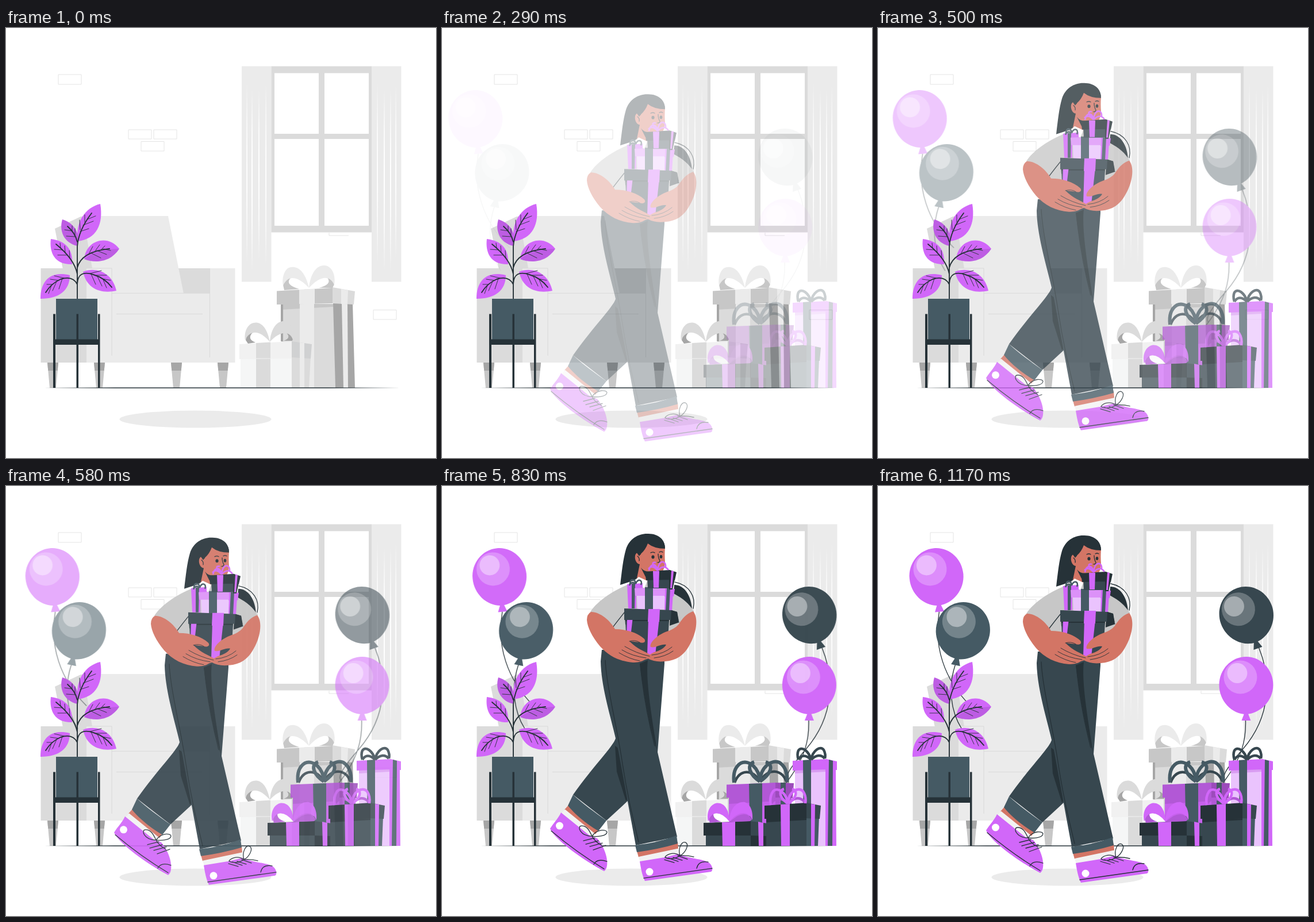
An HTML page that plays this animation: 748 px wide and 748 px high, repeating every 1.21 s.

```html
<!DOCTYPE html>
<html lang="en">
<head>
<meta charset="utf-8">
<title>Carrying gifts</title>
<style>
  html, body { margin: 0; width: 100%; height: 100%; overflow: hidden; background: #fff; }
  svg { display: block; width: 100vw; height: 100vh; }
  .pink { fill: #d167f9; }
  .plum { fill: #b258d6; }
  .pale { fill: #eac3fd; }
  .ink { fill: #263238; }
  .dark { fill: #37474f; }
  .slate { fill: #455a64; }
  .skin { fill: #d37565; }
  .g1 { fill: #ebebeb; }
  .g2 { fill: #dbdbdb; }
  .g3 { fill: #c7c7c7; }
  .g4 { fill: #a6a6a6; }
  .w { fill: #fff; }
  .line { fill: none; stroke: #263238; stroke-width: 1.3; stroke-linecap: round; stroke-linejoin: round; }
  .stem { stroke-width: 1.9; }
  .vein { stroke-width: .9; }
  .thin { fill: none; stroke: #e4e4e4; stroke-width: 1; }
  .seam { stroke: #d9d9d9; }
  .bow { fill: none; stroke-width: 6; stroke-linejoin: round; }
  .mid { stroke-width: 4.5; }
  .small { stroke-width: 2.6; }
  .rise, .slide, .fade { opacity: 0; }
</style>
</head>
<body>
<svg viewBox="0 0 748 748">
  <defs>
    <g id="leg">
      <path class="g3" d="M0 582h19l-4 44h-11z"/>
      <path class="g4" d="M0 582h19l-1.300 14h-16.400z"/>
    </g>
    <g id="balloon">
      <path d="M0-50C26-50 47-28 47-1C47 27 24 49 0 50C-25 50-47 27-47-1C-47-28-26-50 0-50Z"/>
      <path d="M-3 48h6l5 13h-16z"/>
      <circle class="w" cx="-10" cy="-14.500" r="29" opacity=".25"/>
      <circle class="w" cx="-15.500" cy="-21.500" r="17.500" opacity=".4"/>
    </g>
  </defs>

  <!-- room -->
  <path class="thin" d="M91 81h40v17h-40zM213 177h40v16h-40zM257 177h40v16h-40zM235 197.500h40v16.500h-40zM639 490.500h40v16.500h-40zM562 356v5h34"/>
  <path class="g1" d="M410 66.500h51.500v375h-51.500zM636 66.500h51.500v375h-51.500z"/>
  <path class="g2" fill-rule="evenodd" d="M461.500 66.500h174.500v289h-174.500zM467 78.500v105.500h77v-105.500zM554 78.500v105.500h77v-105.500zM467 193v151h77v-151zM554 193v151h77v-151z"/>
  <path class="w" d="M419 92q2 170 0 320q-1.500-160 0-320M428 105q2 150 0 320q-2-160 0-320M440 105q1.800 150 0 300q-2-150 0-300M452 95q2 150 0 320q-1.500-150 0-320M646 92q2 170 0 320q-1.500-160 0-320M658 105q2 150 0 320q-2-160 0-320M669 105q1.800 150 0 320q-2-150 0-320M678 95q2 150 0 310q-1.500-150 0-310"/>

  <!-- armchair -->
  <use href="#leg" x="72"/><use href="#leg" x="153"/><use href="#leg" x="287"/><use href="#leg" x="368"/>
  <path class="g2" d="M85 349L130 328L150 327V420H99zM300 418h56v44h-56z"/>
  <path class="g1" d="M134 327H282L309 462H160L150 418zM140 418h44v43h171v-43h43.500v164h-258.500z"/>
  <path class="g2" d="M60.500 418h79.500v164h-79.500z"/>
  <path class="thin seam" d="M140 418h44v152M184 461.300h171M192 497.500h150M354.500 418v155"/>

  <!-- pale gifts -->
  <path class="g2" d="M478 480h94l1 146h-93z"/>
  <path class="g3" d="M478 480h92v5l-92 5z"/>
  <path class="g1" d="M511 480h25v146h-25z"/>
  <path class="g4" d="M569 478h34l4 148h-34zM478 481h4v64h-4z"/>
  <path class="g1" d="M584 478h10l1 148h-8z"/>
  <path class="g3" d="M471 457.500L568 452V479L471 481z"/>
  <path class="g2" d="M568 451L607 458L605 481L568 479z"/>
  <path class="g1" d="M510 455l27-1.500v26.500h-27zM583 454l12 2-1 24h-11z"/>
  <path class="g3" d="M482 447C484 437 491 432 499 432C488 439 488 448 510 454L484 456zM571 446C570 436 563 431 555 431C565 438 565 447 544 452L568 452z"/>
  <path class="g1" d="M527 452C520 420 504 411 490 418C482 425 480 438 482 448C490 430 506 430 527 452C530 424 543 409 559 414C571 420 573 435 571 447C563 428 545 432 527 452"/>
  <path fill="#f5f6f6" d="M408 574h90v52h-90z"/>
  <path class="g2" d="M435 574h25v52h-25zM497 572h33l-3 54h-30z"/>
  <path fill="#f1f1f1" d="M406 550L497 545V575L406 576z"/>
  <path fill="#d0d1d2" d="M497 545L532 550L530 575L497 573z"/>
  <path class="g2" d="M435 548l25-1.500v28h-25z"/>
  <path class="g1" d="M511 547l8 1v78h-8z"/>
  <path class="g4" d="M417 543C418 535 423 530 430 529C422 536 423 543 434 547L421 549zM499 541C498 534 493 529 486 529C494 535 493 541 483 544L498 544z"/>
  <path class="g2" d="M459 546C454 520 443 510 430 513C419 516 414 530 416 543C425 524 442 526 459 546C461 523 471 508 487 510C498 515 500 531 499 542C493 525 475 528 459 546"/>

  <path class="ink" d="M64 626L190 625.300H560L687 626L560 626.800H190z"/>
  <ellipse class="g1" cx="329.500" cy="680.500" rx="132" ry="15"/>

  <!-- balloons -->
  <g class="slide">
    <path class="line" d="M106 219C96 278 114 336 160 382M134 311C121 350 126 392 145 422M662 281C682 330 686 398 634 458S610 505 600 516M639 407C640 440 634 472 600 516"/>
    <use href="#balloon" class="pink" transform="translate(101.300 158) rotate(-5)"/>
    <use href="#balloon" class="slate" transform="translate(147.200 252) rotate(12)"/>
    <use href="#balloon" class="dark" transform="translate(640.700 224.700) rotate(-19)"/>
    <use href="#balloon" class="pink" transform="translate(640 347)"/>
  </g>

  <!-- plant -->
  <path class="pink" d="M125 370C120 338 138 312 164 306C170 342 157 367 125 371zM115 411C85 412 75 391 78 367C104 370 117 385 115 411zM60 471C60 440 77 422 111 430C111 456 93 471 60 471zM134 424C155 415 185 424 192 457C164 463 140 453 134 424zM136 402C139 369 177 358 197 384z"/>
  <path fill="#bd5de3" d="M124 379C101 374 92 353 98 333C118 339 130 356 124 379zM136 402Q157 385 197 384C181 409 154 409 136 402z"/>
  <path class="line stem" d="M124 471V380Q126 352 149 322M124 372Q120 356 107 345M124 417Q131 389 180 384M124 428Q119 402 87 376M124 446Q116 430 95 437Q79 444 69 460M124 445Q125 420 152 429Q172 435 184 451"/>
  <path class="line vein" d="M129 351l-1-17M137 338l0-13M129 354l15-5M134 343l18-7M141 333l15-6M120 361l0-12M115 353l0-9M115 353l-13-2M120 363l-15-1M111 400l-1-13M103 391l-1-12M95 383l-1-9M106 395l-16 0M98 386l-14-1M144 393l7-13M155 388l8-11M166 385l6-6M147 391l18 9M158 387l17 7M168 384l14 3M101 435l-17-4M91 439l-14-2M81 446l-10 0M98 436l-6 18M88 441l-7 16M79 448l-5 14M146 427l20-5M157 430l18 0M167 436l15 3M148 428l8 18M159 432l8 17M169 438l6 14"/>
  <path class="slate" d="M87 471h72v72h-72z"/>
  <path class="ink" d="M82 497.500h4v44h74v-44h3.500v128.500h-3.500v-75h-34v75h-3.500v-75h-36.500v75h-4zM122.500 497.500h3.500v45h-3.500z"/>

  <!-- bright gifts -->
  <g class="fade">
    <path class="pale" d="M614 492h53v134h-53z"/>
    <path fill="#d99cf2" d="M614 493h53v4l-53 3z"/>
    <path class="pink" d="M667 492h18l1 134h-19zM610 478L669 475V493L610 495zM669 475L687 479V494L669 493z"/>
    <path class="slate" d="M628 477l14-1v150h-13zM673 476l7 2-1 148h-8z"/>
    <path class="bow mid" stroke="#37474f" d="M642 476C638 461 626 452 620 460Q617 467 620 476M642 476C645 460 658 451 664 459Q668 467 666 474M642 476Q628 463 620 476M642 476Q656 463 666 474"/>

    <path fill="#c661ec" d="M499 542h82v84h-82z"/>
    <path class="plum" d="M499 542h82v6l-82 5zM580 540h28v86h-28zM495 519.500L580 516V542H495z"/>
    <path fill="#9c4bbb" d="M580 516L612 517L610 543L580 542z"/>
    <path class="slate" d="M534 518l23-1v109h-21zM589 516h9l-1 100h-8z"/>
    <path class="bow mid" stroke="#37474f" d="M553 514C540 492 518 492 509 516M553 514C567 490 591 492 599 514"/>
    <path class="bow" stroke="#455a64" d="M553 514C552 490 534 476 520 482Q505 491 508 516M553 514C554 489 573 475 587 481Q602 491 600 515M553 514C536 503 528 485 543 480M553 514C571 502 579 485 563 480"/>

    <path class="dark" d="M459 606h78v20h-78z"/>
    <path class="ink" d="M537 606h30v20h-30zM455 586L537 583V608H455z"/>
    <path class="dark" d="M537 583L567 587L566 609L537 608z"/>
    <path class="pink" d="M487 585l23-1v42h-22zM550 584l9 2v40h-8z"/>
    <path class="plum" d="M464 580Q468 570 474 568Q468 578 486 584L466 586zM539 580Q532 566 514 574L500 584L536 583z"/>
    <path class="pink" d="M500 584C500 561 489 549 476 552C464 556 460 570 463 584C468 566 482 564 500 584C500 561 513 548 527 550C539 555 541 570 540 581C532 563 514 566 500 584z"/>
    <path class="w" d="M472 571Q485 565 500 584Q474 585 472 571z"/>

    <path class="dark" d="M564 576h70v50h-70z"/>
    <path class="ink" d="M564 576h70v5l-70 4zM561 556L634 551V578L561 579z"/>
    <path class="slate" d="M634 575h22l-2 51h-20z"/>
    <path class="dark" d="M634 551L659 556L657 579L634 578z"/>
    <path class="pink" d="M589 554l16-1v73h-15zM642 553l7 1-1 72h-6z"/>
    <path class="bow mid" stroke="#b258d6" d="M602 552Q582 535 571 554M602 552Q620 535 632 551"/>
    <path class="bow mid" stroke="#d167f9" d="M602 552C598 533 584 523 576 531Q569 541 572 555M602 552C602 532 620 522 628 531Q634 540 632 552M602 552C588 544 584 530 595 527M602 552C616 544 620 530 609 527"/>
  </g>

  <!-- woman -->
  <g class="rise">
    <!-- rear foot -->
    <path class="skin" d="M222 556L273 599L267 609L213 566z"/>
    <path fill="#f2f2f2" d="M214 565.500L267 608.500L262 617L207 574z"/>
    <path class="pink" d="M207 571C202 582 194 589 188 599C197 619 246 654 282 673C289 668 288 654 285 644C282 633 276 623 270 616L258 612z"/>
    <path class="line" d="M190 603Q235 641 282 669M264 661Q270 650 287 656M246 620l20-5M250 626l22-6M257 630l22-6M263 636l22-8M261 612C240 612 234 594 243 594C253 594 257 604 261 612C270 599 286 600 287 605C286 613 268 613 261 612Q266 622 278 628"/>
    <circle class="w" cx="204.500" cy="594" r="6.500"/>
    <path class="dark" d="M302 442C298 456 264 489 228 540L286 585L325 549L330 440z"/>
    <path class="ink" d="M301 455L308 460L325 545L320 551L304 500z"/>
    <path class="slate" d="M228 540C244 555 266 571 286 585L272 603C250 590 231 574 219 559z"/>

    <!-- front foot -->
    <path class="skin" d="M339 638L410 622L411 634L342 649z"/>
    <path fill="#f2f2f2" d="M342 648L411 633.500L413 644L345 658z"/>
    <path class="pink" d="M344 656L387 649L412 643C430 652 453 651 464 658C471 663 472 672 468 674L353 690C348 680 346 668 344 656z"/>
    <path class="line" d="M351 685L470 668M443 668Q446 654 463 657M387 653l17 5M394 650l17 6M402 649l16 5M410 646l17 6M414 646C401 637 388 646 388 649C395 653 408 651 414 646C410 633 417 620 424 623C431 628 422 642 414 646Q426 645 438 648"/>
    <circle class="w" cx="361" cy="674" r="6.500"/>
    <path class="dark" d="M278 288H387V312L375 466L409 613L337 628L307 465C299 420 277 360 276 308z"/>
    <path class="ink" d="M344 312L358 306C354 340 364 400 374 462C362 430 350 360 344 312z"/>
    <path class="line" d="M284 306C286 350 304 420 313 480S332 580 342 622M345 312C350 370 361 420 370 455"/>
    <path class="slate" d="M336 628Q374 624 408 611L410 625Q376 635 339 640z"/>

    <!-- head and hair -->
    <path class="ink" d="M404 175C421 175 434 193 435 220L402 198z"/>
    <path class="line" d="M405 170C430 175 442 195 437 216"/>
    <path class="ink" d="M310 175C313 150 315 130 320 113C326 94 343 85 359 86C377 86 388 97 388 111L352 150L338 166z"/>
    <path class="skin" d="M345 108L366 98L388 110Q387 124 388 135Q387 152 378 157L356 158L357 172L338 168L344 139C335 138 333 121 340 119Q343 118 346 123z"/>
    <path class="ink" d="M343 125L338 118L334 106L345 92Q371 83 382 95Q388 102 388 112Q369 112 358 103Q354 114 346 121zM346 145Q351 152 360 152L354 161z"/>
    <path class="line" d="M363 119q4-2 7 0M378 118q3-2 6 0M376 121q0 7 3 12q0 3-4 3M340 125q4 3 3 8"/>
    <ellipse class="ink" cx="367" cy="126.500" rx="2.600" ry="3"/><ellipse class="ink" cx="381" cy="126" rx="2.300" ry="3"/>

    <!-- shirt -->
    <path class="g3" d="M340 163L320 176C292 188 268 206 258 222L296 256L302 290H385L412 244L438 221C430 208 420 199 403 190z"/>
    <path class="w" d="M342 161L357 168L352 181L334 170z"/>
    <path class="line" d="M296 250Q309 233 322 217"/>

    <!-- carried gifts -->
    <path class="ink" d="M397 222L413 240L396 246zM318 230H395V240L319 244z"/>
    <path class="dark" d="M319 238H395L391 300H322z"/>
    <path class="pink" d="M322 231h10l-4 34h-7zM359 233h19l-7 64h-14z"/>
    <path class="pink" d="M322 174L349 172V183L338 184V216H324z"/>
    <path class="slate" d="M330 173h6l-1 43h-5z"/>
    <path class="pale" d="M339 190h51v28h-50z"/>
    <path class="pink" d="M388 190h14l-2 30h-13zM387 180L405 182L403 195H387z"/>
    <path fill="#dc91f8" d="M335 181L388 179V194H336z"/>
    <path class="slate" d="M353 179h14v40h-14zM391 181h6l-2 39h-6z"/>
    <path class="dark" d="M317 216L399 219L409 222L411 237L397 236L317 236z"/>
    <path class="ink" d="M399 219L409 222L412 238L398 237z"/>
    <path class="pink" d="M359 217h20l-1 22h-20z"/>
    <path class="dark" d="M357 164h47l-3 17h-43z"/>
    <path class="ink" d="M353 152L396 149V166L355 167zM396 149L408 153L405 167L396 166zM395 164l10 1-4 18h-6z"/>
    <path class="pink" d="M367 151h11l-1 29h-9zM399 150l4 1-3 30h-3z"/>
    <path class="bow small" stroke="#455a64" d="M337 173C336 164 327 163 327 173M337 173C340 163 350 166 346 175M337 173Q329 168 326 176"/>
    <path class="bow small" stroke="#d167f9" d="M375 150C372 134 362 139 360 150M375 150C376 131 390 131 389 144M375 150Q365 139 359 147M375 150Q386 138 394 149M375 150Q360 134 372 136"/>

    <!-- arms -->
    <path class="skin" d="M259 222C276 222 293 238 301 252C321 252 340 258 352 269C356 275 349 277 344 275L326 273C340 287 352 290 363 297C365 302 358 303 353 305C347 309 340 310 332 310C309 308 290 299 275 282C261 265 253 249 252 236Q252 226 259 222z"/>
    <path class="skin" d="M437 221C447 233 442 260 431 279C422 297 407 307 388 308Q370 310 358 303C358 298 363 295 369 292C378 290 387 285 390 279C381 277 372 285 363 283C360 277 373 261 397 254Q410 248 414 240C421 230 429 223 437 221z"/>
    <path class="line vein" d="M313 288q18 11 42 14M308 293q18 11 36 14M318 282q20 12 43 17M400 283q-14 12-35 14M402 290q-14 10-33 12M326 273q10-3 18 2"/>
  </g>
</svg>
<script>
  const LOOP = 1210, FPS = 24;
  const all = q => document.querySelectorAll(q);

  const bez = (s, a, b) => 3 * s * (1 - s) * ((1 - s) * a + s * b) + s * s * s;

  // cubic-bezier(.36, -.01, .5, 1.38), which overshoots before settling
  function ease(x) {
    if (x <= 0) return 0;
    if (x >= 1) return 1;
    let lo = 0, hi = 1;
    for (let i = 0; i < 24; i++) {
      const mid = (lo + hi) / 2;
      if (bez(mid, .36, .5) < x) lo = mid; else hi = mid;
    }
    return bez(lo, -.01, 1.38);
  }

  const parts = [
    { els: all('.rise'), delay: 0, x: 0, y: 44.88 },
    { els: all('.fade'), delay: .05, x: 0, y: 0 },
    { els: all('.slide'), delay: .2, x: -44.88, y: 0 }
  ];

  function draw(ms) {
    let step = Math.floor((ms % LOOP + 5) * FPS / 1000);
    if (step < 2) step = 0;
    const sec = (step + .5) / FPS;
    for (const p of parts) {
      const e = ease(sec - p.delay), rest = 1 - e;
      for (const el of p.els) {
        el.style.opacity = Math.max(0, Math.min(1, e));
        el.setAttribute('transform', `translate(${p.x * rest} ${p.y * rest})`);
      }
    }
  }

  const start = performance.now();
  function tick() {
    draw(performance.now() - start);
    requestAnimationFrame(tick);
  }
  tick();
</script>
</body>
</html>
```
